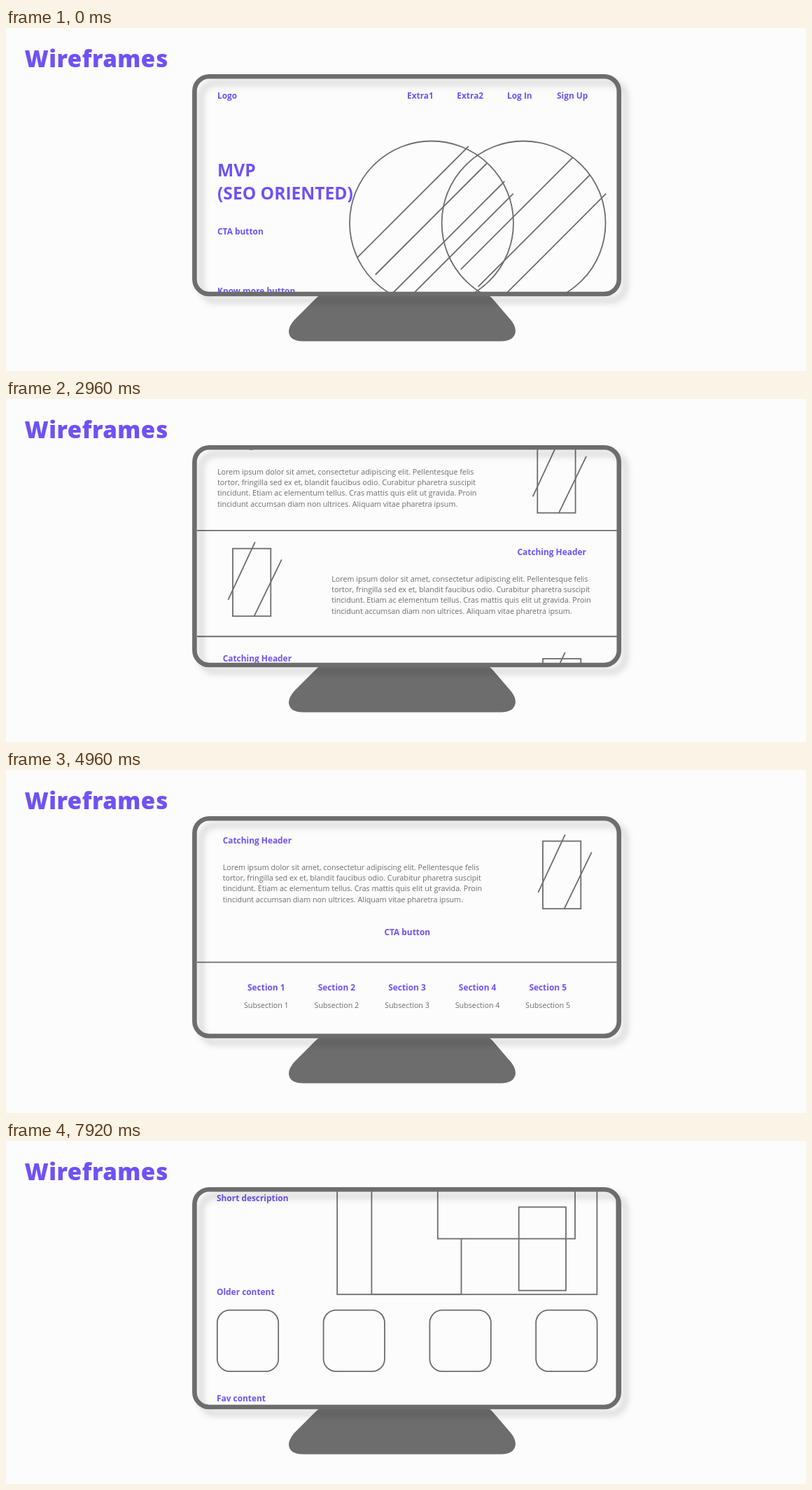
These frames come from a looping animation (1143x490 px, 8 s). An HTML page:

```html
<!DOCTYPE html>
<html lang="en">
<head>
<meta charset="utf-8">
<title>Wireframes</title>
<style>
  html, body { margin: 0; width: 100%; height: 100%; overflow: hidden; background: #fcfcfc; }
  svg { display: block; width: 1143px; height: 490px; }
  text { font: 700 11.9px "Open Sans", "Noto Sans", sans-serif; fill: #7051f5; white-space: pre; }
  .title { font-weight: 800; font-size: 33px; letter-spacing: 0.5px; }
  .hero { font-size: 24.6px; }
  .post { font-size: 24.3px; letter-spacing: -0.3px; }
  .plain { font-weight: 400; fill: #6d6d6d; }
  .body { font-weight: 400; font-size: 10.73px; fill: #6d6d6d; }
  .mid { text-anchor: middle; }
  .wire { fill: none; stroke: #6d6d6d; stroke-width: 1.8; }
  .paper { fill: #fcfcfc; }
  .ring { fill: none; stroke: #6d6d6d; stroke-width: 6.6; filter: drop-shadow(9px 9px 5px rgba(0, 0, 0, .17)); }
</style>
</head>
<body>
<svg viewBox="0 0 1143 490">
  <defs>
    <clipPath id="glass"><rect x="272" y="71" width="602" height="307" rx="19"/></clipPath>
  </defs>
  <rect class="paper" width="1143" height="490"/>
  <text class="title" x="26.5" y="56">Wireframes</text>
  <path fill="#6d6d6d" d="M458 378C449 380 445 384 440 389L412 417Q404 426 404 434Q405 447.5 425 447.5H707Q727 447 728 433Q728 426 722 418L698 390Q691 381 681 378Z"/>
  <rect class="paper" x="270" y="69" width="606" height="311" rx="21"/>
  <g clip-path="url(#glass)">
    <g id="landing"></g>
    <g id="home"></g>
  </g>
  <rect class="ring" x="269.4" y="69.2" width="606.4" height="310.8" rx="21"/>
</svg>
<script>
const LOOP = 8000, STEP = 80;
const LOREM = [
  "Lorem ipsum dolor sit amet, consectetur adipiscing elit. Pellentesque felis",
  "tortor, fringilla sed ex et, blandit faucibus odio. Curabitur pharetra suscipit",
  "tincidunt. Etiam ac elementum tellus. Cras mattis quis elit ut gravida. Proin",
  "tincidunt accumsan diam non ultrices. Aliquam vitae pharetra ipsum."
];

const landing = document.getElementById("landing");
const home = document.getElementById("home");

function add(parent, tag, attrs, content = "") {
  const node = document.createElementNS("http://www.w3.org/2000/svg", tag);
  for (const key in attrs) node.setAttribute(key, attrs[key]);
  node.textContent = content;
  parent.append(node);
  return node;
}
const label = (page, x, y, content, cls = "") => add(page, "text", { x, y, class: cls }, content);
const line = (page, x1, y1, x2, y2) => add(page, "line", { x1, y1, x2, y2, class: "wire" });
const box = (page, x, y, width, height, rx = 0) =>
  add(page, "rect", { x, y, width, height, rx, class: "wire" });

function feature(textX, titleX, baseline, boxX, boxY) {
  label(landing, titleX, baseline, "Catching Header");
  LOREM.forEach((row, i) => label(landing, textX, baseline + 38 + i * 15.15, row, "body"));
  box(landing, boxX, boxY, 54.3, 96.6);
  line(landing, boxX + 31.8, boxY - 9.2, boxX - 6.6, boxY + 73.2);
  line(landing, boxX + 69.8, boxY + 15.8, boxX + 30.4, boxY + 97);
}

function buildLanding() {
  [[302, "Logo"], [573, "Extra1"], [644.3, "Extra2"], [716, "Log In"], [787, "Sign Up"]]
    .forEach(([x, name]) => label(landing, x, 101, name));
  label(landing, 302, 212, "MVP", "hero");
  label(landing, 302, 245.2, "(SEO ORIENTED)", "hero");
  label(landing, 302, 295.2, "CTA button");
  label(landing, 302, 380, "Know more button");

  for (const cx of [608, 739.6]) add(landing, "circle", { cx, cy: 278.5, r: 117, class: "wire" });
  [[661, 168.8], [687.3, 193], [712.3, 219], [724.8, 236.6], [809.3, 185.4], [834, 210.2], [857.3, 236.6]]
    .forEach(([x, y]) => line(landing, x, y, x - 159.5, y + 159.5));

  feature(302, 302, 464.4, 759.3, 460.4);
  feature(465.3, 730.5, 617.4, 324, 608);
  feature(309.7, 309.7, 769, 767, 765.4);
  for (const y of [582.2, 733.6, 938.5]) line(landing, 273, y, 873, y);

  label(landing, 573.3, 899.8, "CTA button", "mid");
  for (let i = 0; i < 5; i++) {
    const x = 371.8 + i * 100.6;
    label(landing, x, 979, "Section " + (i + 1), "mid");
    label(landing, x, 1004, "Subsection " + (i + 1), "body mid");
  }
}

function buildHome() {
  add(home, "rect", { x: 273, y: 72, width: 600, height: 1000, class: "paper" });
  line(home, 872.4, 72, 872.4, 1072);
  [[301, "Logo"], [585, "Library"], [661.3, "Store"], [728, "Assitance"], [819, "User"]]
    .forEach(([x, name]) => label(home, x, 103.4, name));
  label(home, 334, 103.4, "(home button)", "plain");
  label(home, 300.5, 177.6, "New Post", "post");
  label(home, 300.5, 210.8, "Header", "post");
  label(home, 301, 233.2, "Short description");
  label(home, 301, 367.4, "Older content");
  label(home, 301, 519.2, "Fav content");

  box(home, 473.2, 189.6, 177.3, 176.6);
  box(home, 522.4, 178, 322, 188.2);
  box(home, 616.8, 160, 196.2, 126.6).style.fill = "#fcfcfc";
  box(home, 732.7, 241.4, 67.3, 119.2);
  for (let i = 0; i < 4; i++) box(home, 301.8 + i * 151.8, 388.6, 87.4, 87.6, 18);
}

const glide = p => p < .5 ? .5 * (2 * p) ** 2.5 : 1 - .5 * (2 - 2 * p) ** 2.5;

// Each move: start, end, from, to
const LANDING_SCROLL = [
  [360, 1470, 0, 208.3],
  [2250, 3540, 208.3, 510],
  [4340, 5060, 510, 667],
  [5060, 6523, 667, 0]
];
const HOME_FADE = [[6400, 6720, 0, 1]];
const HOME_SCROLL = [[7380, 8460, 0, 294]];

function valueAt(moves, t) {
  let value = moves[0][2];
  for (const [start, end, from, to] of moves) {
    if (t < start) break;
    value = from + (to - from) * glide(Math.min(1, (t - start) / (end - start)));
  }
  return value;
}

function draw(now) {
  const time = now % LOOP;
  const t = time - time % STEP;
  landing.setAttribute("transform", `translate(0 ${-valueAt(LANDING_SCROLL, t)})`);
  home.setAttribute("transform", `translate(0 ${-valueAt(HOME_SCROLL, t)})`);
  home.setAttribute("opacity", valueAt(HOME_FADE, t));
}

buildLanding();
buildHome();
draw(0);
const origin = performance.now();
requestAnimationFrame(function tick() {
  draw(performance.now() - origin);
  requestAnimationFrame(tick);
});
</script>
</body>
</html>
```
